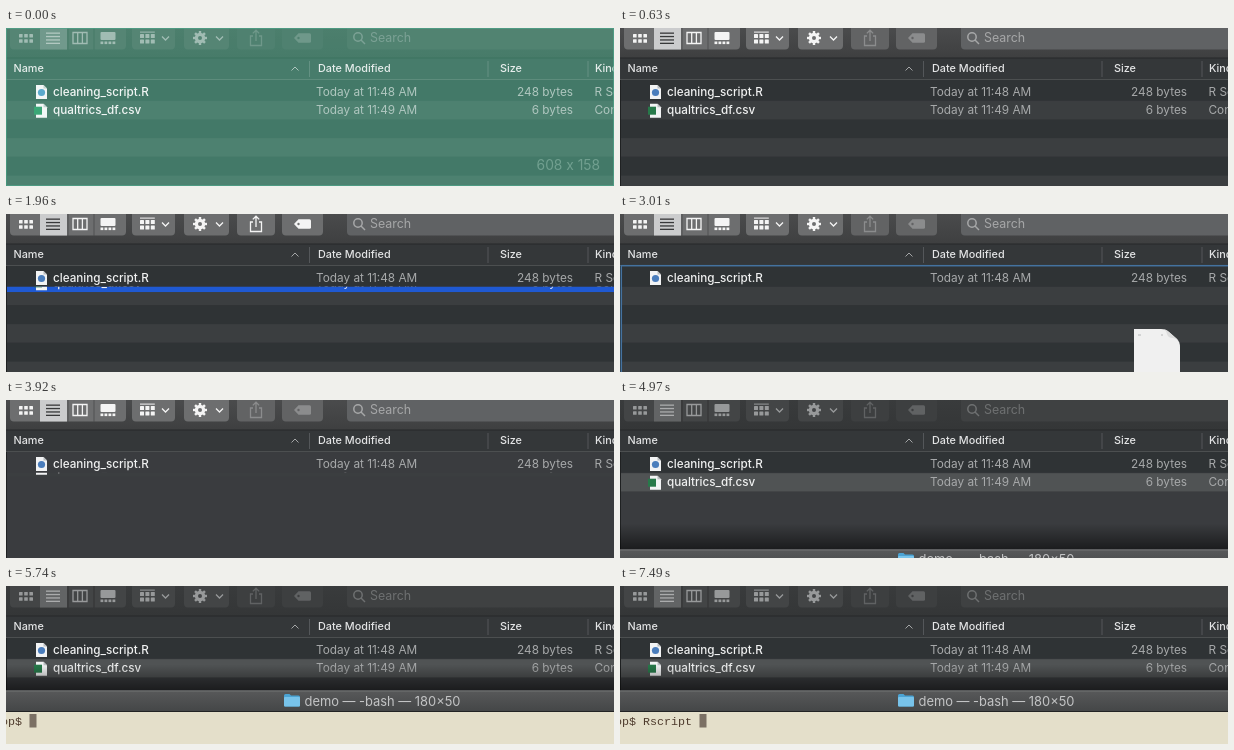
Animation of 608 by 158 pixels, one loop 8 s. Source, as an HTML page:

```html
<!DOCTYPE html>
<html lang="en">
<head>
<meta charset="utf-8">
<title>File list and terminal</title>
<style>
  html, body { margin: 0; width: 100%; height: 100%; overflow: hidden; background: #2d3031; }
  svg { display: block; width: 608px; height: 158px; font-family: Inter, "Open Sans", sans-serif; }
  text { white-space: pre; }

  .win { --bar: #4a4b4c; --bar2: #3e3f40; --btn: #6d6e6f; --on: #cbcccd; --onIcon: #38393a; --icon: #f4f4f4;
         --off: #626364; --offIcon: #8b8c8d; --field: #606264; --hint: #a6a7a8; }
  .win.idle { --bar: #393b3c; --bar2: #343637; --btn: #434546; --on: #626465; --onIcon: #aaabac; --icon: #97999a;
              --off: #3d3f40; --offIcon: #606263; --field: #3f4142; --hint: #6e7071; }
  .btn { fill: var(--btn); }
  .icon { fill: var(--icon); }
  .line { fill: none; stroke: var(--icon); stroke-width: 1.3; }
  .file .btn { fill: var(--off); }
  .file .icon { fill: var(--offIcon); }
  .file .line { stroke: var(--offIcon); }
  .file.ready .btn { fill: var(--btn); }
  .file.ready .icon { fill: var(--icon); }
  .file.ready .line { stroke: var(--icon); }

  .head { font-size: 10.85px; font-weight: 500; fill: #e3e4e5; }
  .row { font-size: 11.8px; }
  .row .name { fill: #f0f1f1; font-weight: 500; font-size: 11.7px; }
  .row .info { fill: #a7a9aa; }
  .row .band { fill: #3b3e40; }
  .row.grey .band { fill: #505354; }
  .row.blue .band { fill: #1f59d2; }
  .row.blue .info { fill: #dde7fa; }
  .mono { font: 11.67px "Liberation Mono", monospace; fill: #4d3a2c; }
  #veil .tint { fill: rgb(24 88 64); mix-blend-mode: screen; }
</style>
</head>
<body>
<svg viewBox="0 0 608 158" id="stage"></svg>
<script>
const LOOP = 8000, STEP = 70, ROW = 18.7, TOP = 54;

const rect = (x, y, w, h, attrs = "") => `<rect x="${x}" y="${y}" width="${w}" height="${h}" ${attrs}/>`;
const text = (x, y, s, attrs = "") => `<text x="${x}" y="${y}" ${attrs}>${s}</text>`;
const path = (d, attrs) => `<path d="${d}" ${attrs}/>`;
const repeat = (n, draw) => Array.from({ length: n }, (_, i) => draw(i)).join("");
const button = (x, w) => rect(x, -4, w, 25.5, 'rx="4" class="btn"');
const chevron = x => path(`M${x} 8.5l3.5 3.5l3.5-3.5`, 'class="line"');

const dots = (x, size, gap) => repeat(6, i =>
  rect(x + i % 3 * gap, 6 + (i > 2 ? gap : 0), size, size, 'class="icon" rx=".5"'));

const gear = `<g transform="translate(194 10)">
  ${repeat(8, i => rect(-1.2, -7, 2.4, 4, `class="icon" transform="rotate(${i * 45})"`))}
  <circle r="5.2" class="icon"/><circle r="2" class="btn"/></g>`;

const toolbar = `
  ${rect(0, 0, 608, 31, 'fill="url(#bar)"')}
  ${button(4, 116)}
  ${rect(34, -4, 27, 25.5, 'fill="var(--on)"')}
  ${dots(13, 3.6, 5.2)}
  ${repeat(4, i => rect(40, 4.5 + i * 3.4, 14, 1.3, 'fill="var(--onIcon)"'))}
  ${path("M67 4.5h14v11h-14zM71.7 4.5v11M76.4 4.5v11", 'class="line"')}
  ${rect(94.5, 4, 15, 8, 'class="icon" rx="1"')}
  ${repeat(4, i => rect(94.5 + i * 4, 13.5, 2.8, 2.6, 'class="icon"'))}
  ${repeat(2, i => rect(61.5 + i * 26, -4, 1, 25.5, 'fill="#0004"'))}
  ${button(126, 43)}
  ${dots(134, 4, 5.4)}
  ${rect(134, 3.6, 14.8, 1, 'class="icon"')}
  ${chevron(156)}
  ${button(178, 45)}
  ${gear}
  ${chevron(210)}
  <g class="file" id="actions">
    ${button(231, 38)}
    ${path("M247 8h-2.5v9.5h11v-9.5h-2.5M250 13v-10.5M246.8 5.4l3.2-3.2l3.2 3.2", 'class="line"')}
    ${button(276, 41)}
    ${path("M288 10l4.5-4.8h11q1.5 0 1.5 1.5v6.6q0 1.5-1.5 1.5h-11z", 'class="icon"')}
    <circle cx="292.5" cy="10" r="1.2" class="btn"/>
  </g>
  ${rect(341, -4, 280, 25.5, 'rx="4" fill="var(--field)"')}
  <g fill="none" stroke="var(--hint)" stroke-width="1.5"><circle cx="352" cy="9" r="4.2"/><path d="M355 12l4 4"/></g>
  ${text(364, 14.3, "Search", 'font-size="12.4" fill="var(--hint)"')}`;

const header = `
  ${rect(0, 30, 608, 21.5, 'fill="#343739"')}
  ${rect(0, 29.5, 608, 1, 'fill="#26282a"')}
  ${rect(0, 51, 608, 1, 'fill="#4c4f50"')}
  <g class="head">
    ${text(7.5, 44, "Name")}${text(312, 44, "Date Modified")}
    ${text(494, 44, "Size")}${text(589, 44, "Kind")}
  </g>
  ${[303, 481.5, 581.5].map(x => rect(x, 33, 1, 16, 'fill="#54575a"')).join("")}
  ${path("M285.5 42.5l3.5-3.5l3.5 3.5", 'fill="none" stroke="#a4a6a7"')}`;

const page = '<path d="M30 57h7.5l3.5 3.5v10.500h-11z" fill="#f2f3f4"/><path d="M37.5 57v3.5h3.5z" fill="#b9bdc0"/>';

const row = (name, time, size, kind, badge, id) => `
  <g class="row" id="${id}">
    ${rect(0, TOP + .5, 608, ROW - .5, id === "data" ? 'class="band"' : 'fill="none"')}
    ${page}${badge}
    ${text(47, 67.6, name, 'class="name"')}
    <g class="info">
      ${text(310, 67.6, time)}
      ${text(567, 67.6, size, 'text-anchor="end"')}
      ${text(588.5, 67.6, kind)}
    </g>
  </g>`;

const terminal = `
  <g id="terminal">
    ${rect(-10, -26, 628, 26, 'fill="url(#shade)"')}
    ${rect(0, 0, 608, 21, 'fill="url(#title)"')}
    ${rect(0, 0, 608, 1, 'fill="#727475"')}
    ${rect(0, 20.5, 608, 1, 'fill="#222324"')}
    <path d="M278 5q0-1.5 1.5-1.5h4l1.5 1.5h7.5q1.5 0 1.5 1.5v8q0 1.5-1.5 1.5h-13q-1.5 0-1.5-1.5z" fill="#4ba3d3"/>
    ${rect(278, 6.5, 16, 9.5, 'rx="1" fill="#78c3ea"')}
    ${text(298.5, 15, "demo — -bash — 180×50", 'font-size="12.9" fill="#c3c4c5"')}
    ${rect(0, 21.5, 608, 60, 'fill="#e4dfca"')}
    <g class="mono">${text(-5, 34, "op$")}<text id="typed" x="23" y="34"></text></g>
    ${rect(23.5, 23.5, 7, 13.5, 'id="cursor" fill="#7b7064"')}
  </g>`;

const gradient = (id, from, to) => `<linearGradient id="${id}" x2="0" y2="1">
  <stop style="stop-color:${from}"/><stop offset="1" style="stop-color:${to}"/></linearGradient>`;

const stage = document.getElementById("stage");
stage.innerHTML = `
  <g class="win" id="win">
    <defs>
      ${gradient("bar", "var(--bar)", "var(--bar2)")}
      ${gradient("title", "#58595a", "#444647")}
      ${gradient("shade", "#0000", "#0008")}
      <clipPath id="below">${rect(0, TOP + ROW, 608, 110)}</clipPath>
    </defs>
    ${toolbar}${header}
    ${repeat(6, i => rect(0, TOP + i * ROW, 608, ROW, `fill="${i % 2 ? "#3b3e40" : "#2f3335"}"`))}
    ${rect(0, 52, 608, 2, 'fill="#2f3335"')}
    ${rect(0, 52, 608, 106, 'id="plain" fill="#3a3c3f"')}
    ${rect(0, 52, 608, 2 + ROW, 'id="firstBand" fill="#2f3335"')}
    ${row("cleaning_script.R", "Today at 11:48 AM", "248 bytes", "R Script", '<circle cx="35.5" cy="64.5" r="3.6" fill="#4a7dbc"/>', "script")}
    <g clip-path="url(#below)">
      ${row("qualtrics_df.csv", "Today at 11:49 AM", "6 bytes", "Comma", rect(28, 60, 8, 8, 'fill="#27794a"'), "data")}
    </g>
    ${rect(0, 52, 1, 106, 'fill="#1f2122"')}
  </g>
  <g id="drop">
    ${rect(1.3, 51.7, 620, 120, 'fill="none" stroke="#44729f" stroke-width="1.5"')}
    <g id="sheet">
      <path d="M514 115h27q5 0 8 3l8 7q3 3 3 8v44h-46z" fill="#f0f0f0"/>
      <path d="M541 115q5 0 6 5q1 4 6 4q6 1 7 7q-1-4-3-6l-8-7q-3-3-8-3z" fill="#dcdcdc"/>
      <path d="M518 121h3M541 121h2" stroke="#b5b7b8"/>
    </g>
  </g>
  ${terminal}
  <g id="veil">
    ${rect(0, 0, 608, 158, 'class="tint"')}
    ${rect(.5, .5, 607, 157, 'fill="none" stroke="#4fa58a" opacity=".7"')}
    ${text(594, 142, "608 x 158", 'text-anchor="end" font-size="13.8" fill="#a9cfc0" opacity=".45"')}
  </g>`;

const el = id => document.getElementById(id);
const [win, actions, plain, firstBand, data, drop, sheet, term, typed, cursor, veil] =
  ["win", "actions", "plain", "firstBand", "data", "drop", "sheet", "terminal", "typed", "cursor", "veil"].map(el);
const tint = veil.querySelector(".tint");

const KEYS = [6580, 6860, 6930, 7070, 7210, 7280, 7420, 7490];
const COMMAND = "Rscript ";

// Progress from 0 to 1 over a number of steps, the first step already moving.
const progress = (t, start, steps) => Math.min(1, Math.max(0, (t - start) / STEP + 1) / steps);
const easeOut = k => 1 - (1 - k) ** 2;
const show = (node, visible) => { node.style.display = visible ? "" : "none"; };
const move = (node, x, y) => node.setAttribute("transform", `translate(${x} ${y})`);

function draw(time) {
  const t = Math.floor(time / STEP) * STEP;
  const within = (from, to) => t >= from && t < to;

  // The screen blend sits on the tint alone, so fade by its colour strength.
  show(veil, t < 140);
  tint.style.fillOpacity = t < 70 ? 1 : .45;

  win.classList.toggle("idle", !within(630, 4130));
  actions.classList.toggle("ready", within(1190, 2030));

  // The empty list loses its stripes; only the first row gets its band back.
  show(plain, t >= 3220);
  show(firstBand, t >= 4130);

  const shown = t < 3010 ? 1 - progress(t, 1680, 7) : progress(t, 3920, 5);
  show(data, shown > 0);
  move(data, 0, ROW * shown);
  data.classList.toggle("blue", within(980, 2100));
  data.classList.toggle("grey", t >= 4130);

  show(drop, within(3010, 3220));
  show(sheet, t < 3150);
  move(sheet, 0, t < 3080 ? 0 : -14);

  show(term, t >= 4970);
  move(term, 0, 158 - 53.5 * easeOut(progress(t, 4970, 12)));

  const count = KEYS.filter(key => t >= key).length;
  typed.textContent = COMMAND.slice(0, count);
  move(cursor, count * 7, 0);
}

function tick(now) {
  draw(now % LOOP);
  requestAnimationFrame(tick);
}
draw(0);
requestAnimationFrame(tick);
</script>
</body>
</html>
```
